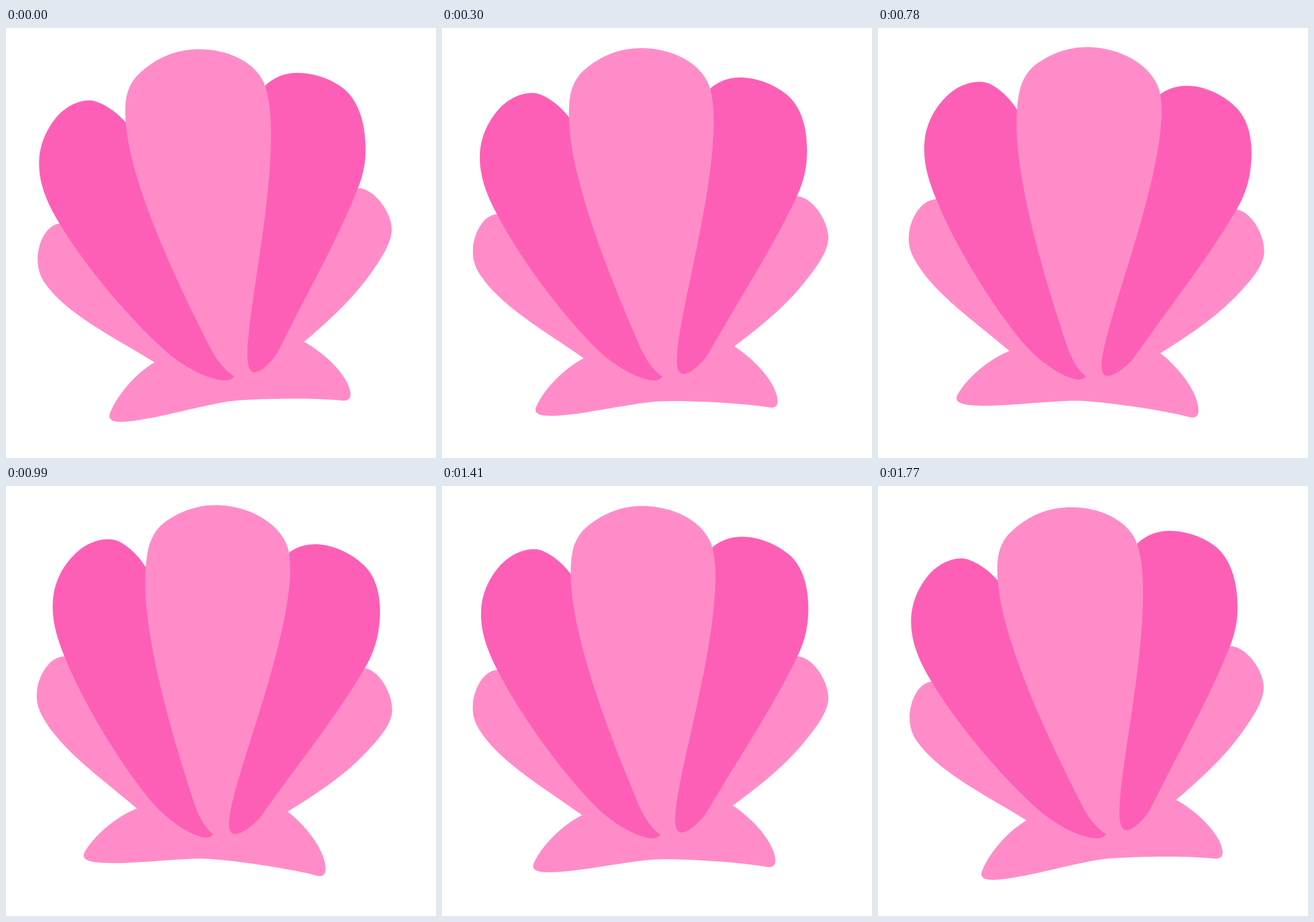
These frames come from a looping animation (748x748 px, 1800 ms). An HTML page:

```html
<!DOCTYPE html>
<html lang="en">
<head>
<meta charset="utf-8">
<title>Rocking shell</title>
<style>
  html, body { margin: 0; width: 100%; height: 100%; overflow: hidden; background: #fff; }
  svg { display: block; width: 100%; height: 100%; }
  .light { fill: #ff8cc8; }
  .dark { fill: #fe5fb6; }
</style>
</head>
<body>
<svg viewBox="0 0 748 748">
  <g id="shell">
    <!-- side lobes and base -->
    <path class="light" d="M93 340C67 344 55 379 55 402C55 424 62 437 73 451C113 502 193 541 258.500 581.500
      C222 603 191 643 181 670C176 683 188 686 205 685C256 682 339 656 392 649C437 644 538 643 584 648
      C593 649 600 647 599.500 636C596 603 549 562 518.500 546C566 505 601 473 633 429C652 402 671 374 671 350
      C671 321 641 279 612 278.500Z"/>
    <!-- left and right lobes -->
    <path class="dark" d="M208 164C190 143 163 127 147 126C125 125 102 138 87 156C70 177 57 205 57.500 238
      C58 272 71 304 93 340C144 425 228 519 281 565C318 596 358 613 382 613C390 613 395 609 396.500 605L300 300Z"/>
    <path class="dark" d="M420 568C420 588 424 599 432 599C444 599 462 580 472 565C482 545 498 514 510 490
      C545 423 583 352 612 279C622 255 626 230 625.500 208C625 163 612 123 584 103C562 87 533 78 508 78
      C484 78 466 86 451 100L410 560Z"/>
    <!-- middle lobe -->
    <path class="light" d="M396.500 605C378 595 363 572 352 550C314 475 277 397 249 322C227 263 208 200 207.500 146
      C207 118 214 98 228 83C253 58 288 37 336 37C388 37 432 60 448 94C459 121 461 152 461 187
      C461 273 443 382 430 470C425 506 420 541 420 568Z"/>
  </g>
</svg>
<script>
  const STEP = 30, STEPS = 60, PEAK = 30, SWING = 10;
  const shell = document.getElementById('shell');
  const start = performance.now();

  // Linear swing out to the peak, then back to rest by the last step.
  function angleAt(step) {
    const progress = step <= PEAK ? step / PEAK : (STEPS - 1 - step) / (STEPS - 1 - PEAK);
    return SWING * progress;
  }

  function render(now) {
    const step = Math.floor(Math.max(0, now - start) / STEP) % STEPS;
    shell.setAttribute('transform', `rotate(${angleAt(step)} 374 374)`);
    requestAnimationFrame(render);
  }

  render(start);
</script>
</body>
</html>
```
